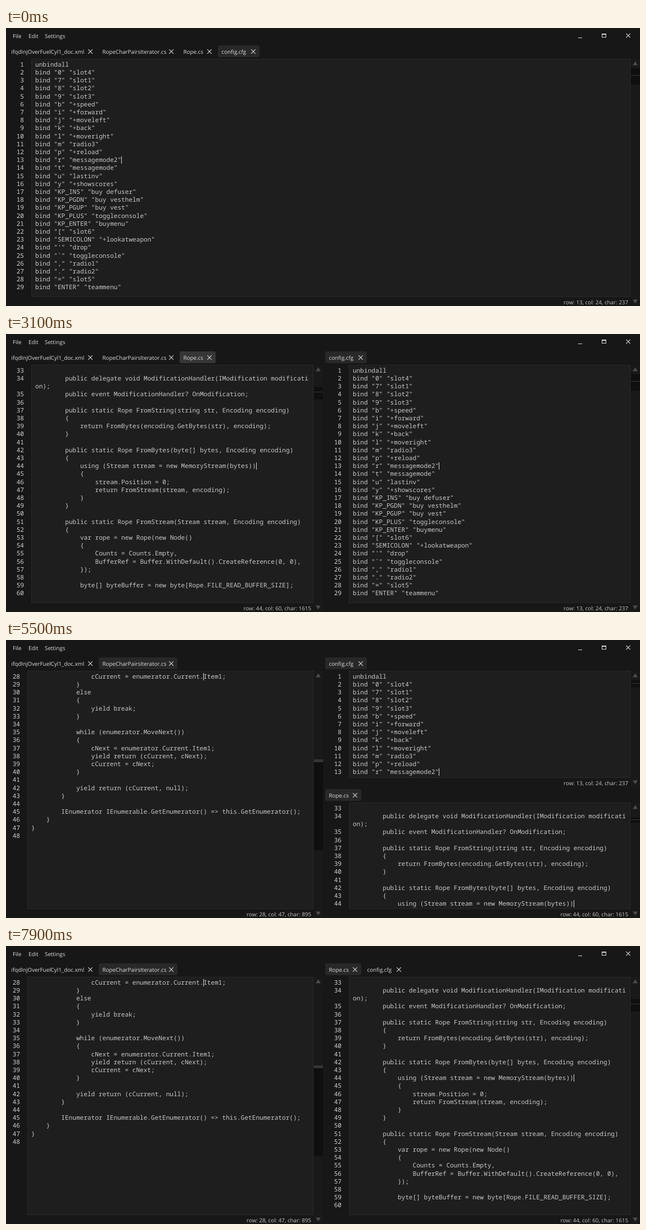
An HTML page with a canvas that plays this animation: 1128x496 px, repeating every 8000 ms.

```html
<!DOCTYPE html>
<html lang="en">
<head>
<meta charset="utf-8">
<title>Text editor with split panes</title>
<style>
  html, body { margin: 0; width: 100%; height: 100%; overflow: hidden; background: #171717; }
  canvas { display: block; }
</style>
</head>
<body>
<canvas id="stage" width="1128" height="496"></canvas>
<script>
const ctx = document.getElementById('stage').getContext('2d');
const LOOP = 8000, TICK = 100;
const ROW = 14.2, CHAR = 6.66, WRAP = 73;
const UI = '9.8px "Open Sans", "Noto Sans", sans-serif';
const CODE = '11.1px "Noto Sans Mono", "DejaVu Sans Mono", monospace';

const binds = "0 slot4|7 slot1|8 slot2|9 slot3|b +speed|i +forward|j +moveleft|k +back|" +
  "l +moveright|m radio3|p +reload|r messagemode2|t messagemode|u lastinv|y +showscores|" +
  "KP_INS buy defuser|KP_PGDN buy vesthelm|KP_PGUP buy vest|KP_PLUS toggleconsole|" +
  "KP_ENTER buymenu|[ slot6|SEMICOLON +lookatweapon|' drop|` toggleconsole|, radio1|" +
  ". radio2|= slot5|ENTER teammenu";
const configText = ['unbindall', ...binds.split('|').map(b => b.replace(/^(\S+) (.*)$/, 'bind "$1" "$2"'))].join('\n');

const ropeText = `
        public delegate void ModificationHandler(IModification modification);
        public event ModificationHandler? OnModification;

        public static Rope FromString(string str, Encoding encoding)
        {
            return FromBytes(encoding.GetBytes(str), encoding);
        }

        public static Rope FromBytes(byte[] bytes, Encoding encoding)
        {
            using (Stream stream = new MemoryStream(bytes))
            {
                stream.Position = 0;
                return FromStream(stream, encoding);
            }
        }

        public static Rope FromStream(Stream stream, Encoding encoding)
        {
            var rope = new Rope(new Node()
            {
                Counts = Counts.Empty,
                BufferRef = Buffer.WithDefault().CreateReference(0, 0),
            });

            byte[] byteBuffer = new byte[Rope.FILE_READ_BUFFER_SIZE];
`;

const iteratorText = `                cCurrent = enumerator.Current.Item1;
            }
            else
            {
                yield break;
            }

            while (enumerator.MoveNext())
            {
                cNext = enumerator.Current.Item1;
                yield return (cCurrent, cNext);
                cCurrent = cNext;
            }

            yield return (cCurrent, null);
        }

        IEnumerator IEnumerable.GetEnumerator() => this.GetEnumerator();
    }
}
`;

// Numbered visual rows; long lines continue on an unnumbered row.
function layOut(text, first) {
  return text.split('\n').flatMap((line, i) => {
    const row = { no: first + i, text: line.slice(0, WRAP) };
    return line.length > WRAP ? [row, { no: '', text: line.slice(WRAP) }] : [row];
  });
}

// caret: [row, column]; thumb: [from, to, mark, mark height], fractions of the track
const xml = { name: 'ifqdInjOverFuelCyl1_doc.xml', width: 158 };
const iterator = {
  name: 'RopeCharPairsIterator.cs', width: 140, rows: layOut(iteratorText, 28), gutter: 39,
  caret: [0, 46], status: 'row: 28, col: 47, char: 895', thumb: [.356, .743, .346, 5]
};
const rope = {
  name: 'Rope.cs', width: 64, rows: layOut(ropeText, 33), gutter: 46,
  caret: [12, 59], status: 'row: 44, col: 60, char: 1615', thumb: [.056, .11, .077, 1]
};
const config = {
  name: 'config.cfg', width: 74, rows: layOut(configText, 1), gutter: 46,
  caret: [12, 23], status: 'row: 13, col: 24, char: 237', thumb: [0, .071, .029, 1]
};

const pane = (x, y, w, h, active, ...tabs) => ({ x, y, w, h, active, tabs });
const leftPane = pane(0, 30, 564, 466, iterator, xml, iterator);
const layouts = [
  [0, [pane(0, 30, 1128, 466, config, xml, iterator, rope, config)]],
  [2600, [pane(0, 30, 564, 466, rope, xml, iterator, rope), pane(565, 30, 563, 466, config, config)]],
  [5500, [leftPane, pane(565, 30, 563, 232, config, config), pane(565, 265, 563, 231, rope, rope)]],
  [7600, [leftPane, pane(565, 30, 563, 466, rope, rope, config)]]
];

// Drop zones under the dragged tab
const zones = [
  [0, null],
  [1300, [414, 31, 37, 21]],
  [1500, [0, 55, 1128, 220.5]],
  [1800, [564, 55, 564, 441]],
  [2600, null],
  [4100, [0, 55, 564, 220.5]],
  [4300, [282, 55, 282, 441]],
  [4400, [564, 55, 283, 441]],
  [4800, [564, 275.5, 564, 220.5]],
  [5500, null],
  [6500, [564, 159, 564, 103]],
  [6600, [564, 55, 564, 104]],
  [6700, [605, 31, 37, 21]],
  [7200, [568, 31, 37, 21]],
  [7600, null]
];

const held = [[0, null], [600, config], [2600, null], [3000, rope], [5500, null], [6100, rope], [7600, null]];

const at = (steps, t) => steps.findLast(s => s[0] <= t);

function box(color, x, y, w, h) {
  ctx.fillStyle = color;
  ctx.fillRect(x, y, w, h);
}

function label(text, x, y, color, font = UI, align = 'left') {
  ctx.font = font;
  ctx.textAlign = align;
  ctx.fillStyle = color;
  ctx.fillText(text, x, y);
}

function cross(x, y, r) {
  ctx.strokeStyle = '#d2d2d2';
  ctx.lineWidth = 1.2;
  ctx.beginPath();
  ctx.moveTo(x - r, y - r); ctx.lineTo(x + r, y + r);
  ctx.moveTo(x + r, y - r); ctx.lineTo(x - r, y + r);
  ctx.stroke();
}

function arrow(x, y, dir) {
  ctx.fillStyle = '#4b4b4b';
  ctx.beginPath();
  ctx.moveTo(x - 4.5, y + 3.5 * dir);
  ctx.lineTo(x + 4.5, y + 3.5 * dir);
  ctx.lineTo(x, y - 3.5 * dir);
  ctx.fill();
}

function drawTabs(p, pressed) {
  let x = p.x + 3;
  for (const tab of p.tabs) {
    if (tab === p.active) {
      ctx.fillStyle = tab === pressed ? '#363636' : '#282828';
      ctx.beginPath();
      ctx.roundRect(x, p.y + 1, tab.width, 21, 3);
      ctx.fill();
    }
    label(tab.name, x + 6.5, p.y + 15.5, '#dcdcdc');
    cross(x + tab.width - 11, p.y + 12, 3.8);
    x += tab.width + 4;
  }
}

function drawScroll(p, thumb) {
  const left = p.x + p.w - 17, mid = p.x + p.w - 8.5;
  const top = p.y + 42, size = p.h - 58;
  const [from, to, mark, markH] = thumb;
  box('#191919', left, p.y + 25, 17, p.h - 25);
  box('#0f0f0f', left + 1, top + from * size, 16, (to - from) * size);
  box('#353535', left + 1, Math.round(top + mark * size), 16, markH);
  arrow(mid, p.y + 33, 1);
  arrow(mid, p.y + p.h - 8, -1);
}

function drawPane(p, pressed) {
  const doc = p.active, left = p.x + doc.gutter;
  const w = p.x + p.w - 17 - left, h = p.h - 41;
  drawTabs(p, pressed);
  box('#282828', left - 1, p.y + 25, w + 1, h);
  box('#1e1e1e', left, p.y + 26, w - 1, h - 2);
  drawScroll(p, doc.thumb);
  doc.rows.slice(0, Math.floor(h / ROW)).forEach((row, i) => {
    const y = p.y + 38.7 + i * ROW;
    label(row.no, left - 14, y, '#d0d0d0', CODE, 'right');
    label(row.text, left + 6, y, '#c8c8c8', CODE);
  });
  const [row, col] = doc.caret;
  box('#d8d8d8', Math.round(left + 6 + col * CHAR), Math.round(p.y + 28.5 + row * ROW), 1, 13);
  label(doc.status, p.x + p.w - 21, p.y + p.h - 3, '#c4c4c4', UI, 'right');
}

function drawTitleBar() {
  label('File', 12, 17.5, '#dcdcdc');
  label('Edit', 40, 17.5, '#dcdcdc');
  label('Settings', 69, 17.5, '#dcdcdc');
  box('#d8d8d8', 1018, 17, 7, 1);
  ctx.strokeStyle = '#d8d8d8';
  ctx.lineWidth = 1;
  ctx.strokeRect(1060.5, 10.5, 7, 6);
  box('#d8d8d8', 1060, 10, 8, 2);
  cross(1107, 13.5, 3.7);
}

function draw(now) {
  const t = Math.floor(now % LOOP / TICK) * TICK;
  ctx.textRendering = 'geometricPrecision';
  box('#171717', 0, 0, 1128, 496);
  drawTitleBar();
  const pressed = at(held, t)[1];
  at(layouts, t)[1].forEach(p => drawPane(p, pressed));
  const [start, zone] = at(zones, t);
  if (zone) {
    const alpha = .3 * Math.min(1, .5 + (t - start) / 250);
    box(`rgba(34, 77, 160, ${alpha})`, ...zone);
  }
}

const begin = performance.now();
(function frame() {
  draw(performance.now() - begin);
  requestAnimationFrame(frame);
})();
</script>
</body>
</html>
```
